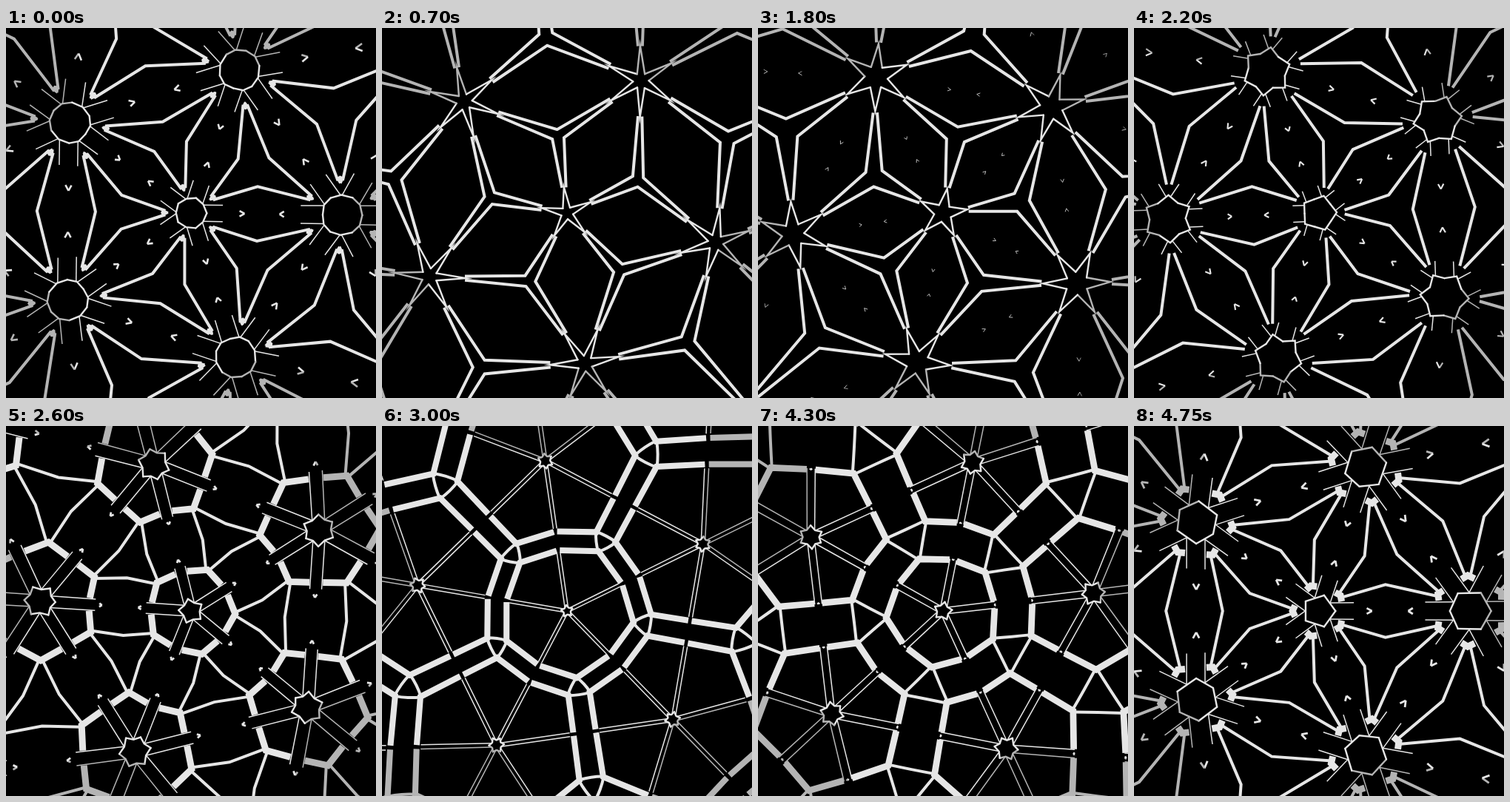
An HTML page with a canvas for the animation above (4.8 s loop, 500 by 500 pixels).

```html
<!DOCTYPE html>
<html lang="en">
<head>
<meta charset="utf-8">
<title>Geodesic kaleidoscope</title>
<style>
html, body { margin: 0; width: 100%; height: 100%; overflow: hidden; background: #000; }
canvas { display: block; }
</style>
</head>
<body>
<canvas width="500" height="500"></canvas>
<script>
const ctx = document.querySelector('canvas').getContext('2d');
const LOOP = 4800, STEP = 50;
const INFLATE = 0.94, CAMERA = 0.593, ZOOM = 578;

const mix = (a, b, k) => a.map((v, i) => v + (b[i] - v) * k);

// The motif swings to and fro once per loop: u opens the stars, then v spreads the bars.
function poseAt(t) {
  const away = Math.abs(t - LOOP / 4);
  const swing = Math.min(away, LOOP - away) / (LOOP / 4);
  const u = Math.min(1, swing), v = Math.max(0, swing - 1);
  const fade = Math.max(0, 1 - v / .85);
  const spread = Math.cos(fade * Math.PI / 2);
  const edge = .245 * u * fade;
  return {
    edge,
    tip: v ? edge * (.55 + .2 * (1 - v) ** 3) : .184 + .18 * (1 - u ** 3),
    bold: .36 + .61 * spread,
    bend: .58 + .45 * (1 - u) + .38 * spread ** 2,
    gap: .05 * (1 - spread),
    bar: Math.max(0, .14 - 2 * (1 - u)) + .83 * spread,
    armEnd: .53 * u * u + .36 * spread,
    armOffset: .01 + .18 * (1 - spread),
    apex: .76 + .2 * (1 - u),
    chevron: .065 * u * Math.max(0, 1 - 2 * v),
    chevronWidth: 2.8 * u * u
  };
}

// Point on the sphere model: distance from the axis, turn in degrees, depth.
function point(radius, degrees, depth, scale = 1) {
  const a = degrees * Math.PI / 180;
  return [radius * Math.cos(a) * scale, radius * Math.sin(a) * scale, depth * scale];
}

const pole = [0, 0, 1];
const near = i => point(.5257, 72 * i, .8507, INFLATE);
const far = i => point(.8507, 72 * i + 36, .5257, INFLATE);
const corner = i => point(.8944, 72 * i, .4472);
const triangles = [];
for (let i = 0; i < 5; i++) {
  triangles.push(
    { v: [near(i), corner(i), far(i)], color: '#b4b4b4' },
    { v: [near(i), corner(i), far(i - 1)], color: '#b4b4b4' },
    { v: [near(i), near(i + 1), far(i)], color: '#e6e6e6' },
    { v: [pole, near(i), near(i + 1)], color: '#e6e6e6' }
  );
}

function project([x, y, z], turn) {
  const k = ZOOM / (CAMERA + z), c = Math.cos(turn), s = Math.sin(turn);
  return [250 + k * (x * c - y * s), 250 + k * (x * s + y * c)];
}

function stroke(points, width, cap = 'butt') {
  ctx.lineWidth = width;
  ctx.lineCap = cap;
  ctx.beginPath();
  points.forEach(p => ctx.lineTo(...p));
  ctx.stroke();
}

function drawTriangle({ v, color }, pose, turn) {
  const { edge, tip, bold, bend, gap, bar, armEnd, armOffset, apex, chevron, chevronWidth } = pose;
  const center = [0, 1, 2].map(i => (v[0][i] + v[1][i] + v[2][i]) / 3);

  // s runs from a vertex to its edge middle, h from the edge to the centre.
  const sector = (a, b) => {
    const mid = mix(a, b, .5);
    return (s, h) => project(a.map((n, i) => n + s * (mid[i] - n) + h * (center[i] - mid[i])), turn);
  };

  ctx.strokeStyle = color;
  for (let i = 0; i < 3; i++) {
    const a = v[i], b = v[(i + 1) % 3], c = v[(i + 2) % 3];
    const left = sector(a, b), right = sector(a, c), back = sector(b, a);

    if (bar > .01) {
      const h = bold - bar;
      stroke([left(bold, h), left(bold, bold), right(bold, h)], 9 - 2.6 * bar ** 6);
    }

    // Bold line along each edge, bowed while it closes around the centre.
    ctx.lineWidth = 4;
    ctx.lineCap = 'butt';
    ctx.beginPath();
    ctx.moveTo(...left(bold, bold - gap));
    if (bold > bend) {
      const s = (1 + bold) / 2;
      ctx.quadraticCurveTo(...left(s, bend), ...left(1, bend));
      ctx.quadraticCurveTo(...back(s, bend), ...back(bold, bold - gap));
    } else {
      ctx.lineTo(...left(1, bend));
      ctx.lineTo(...back(bold, bold - gap));
    }
    ctx.stroke();

    stroke([left(edge, 0), left(tip, tip), right(edge, 0)], 2.4, 'round');

    for (const at of [left, right]) {
      if (armEnd > tip) stroke([at(tip, armOffset), at(armEnd, armOffset)], 1.5);
      if (chevronWidth > .5) stroke([at(apex - chevron, chevron), at(apex, 0)], chevronWidth);
    }
  }
}

function frame(now) {
  const t = Math.floor(now % LOOP / STEP) * STEP + STEP;
  const turn = t / LOOP * Math.PI * 2 / 5;
  const pose = poseAt(t);
  ctx.fillStyle = '#000';
  ctx.fillRect(0, 0, 500, 500);
  triangles.forEach(tri => drawTriangle(tri, pose, turn));
}

const start = performance.now();
(function tick() {
  frame(performance.now() - start);
  requestAnimationFrame(tick);
})();
</script>
</body>
</html>
```
